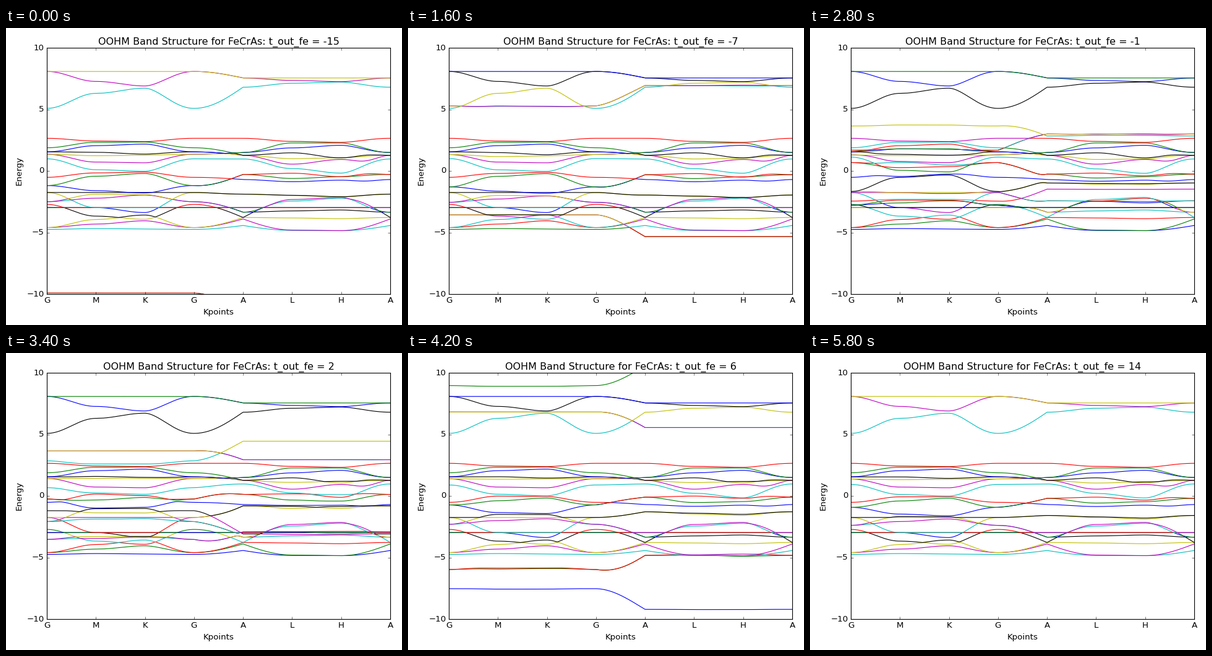
Animation, 640 px wide and 480 px high, one loop 6000 ms. Source, as a matplotlib script:

```python
import numpy as np
import matplotlib.pyplot as plt
from matplotlib.animation import FuncAnimation

plt.style.use("classic")
plt.rcParams.update({
    "figure.facecolor": "white",
    "savefig.dpi": "figure",
    "font.family": "DejaVu Sans",
})

T_MIN, T_MAX = -15, 14
LABELS = ["G", "M", "K", "G", "A", "L", "H", "A"]
KNOTS = [0, 1, 2, 0, 3, 4, 5, 3]      # path through the values at G M K A L H
N = 80                                # samples per segment
U = np.arange(N) / N
COS, SIN = np.cos(np.pi * U / 2), np.sin(np.pi * U / 2)
EASE = (1 - np.cos(np.pi * U)) / 2
SKEW = (1 - np.cos(np.pi * U ** 0.87)) / 2

SMOOTH = [EASE, EASE, SKEW, 1 - COS, EASE, EASE, SKEW]
KINKED = [EASE, EASE, SKEW, 1 - COS, SIN, EASE, 1 - COS]


def path(vals, weights=SMOOTH, bump=0):
    """Band energy along the whole k path; bump bends the last segment."""
    parts = []
    for w, i, j in zip(weights, KNOTS, KNOTS[1:]):
        parts.append(vals[i] + (vals[j] - vals[i]) * w)
    parts[-1] = parts[-1] + bump * np.sin(np.pi * U) ** 2
    return np.append(np.concatenate(parts), vals[3])


def mixing(vals):
    """Coupling strength along the path, rotating from G to A."""
    out = path(vals)
    out[3 * N:4 * N] = vals[0] * COS + vals[3] * SIN
    return out


def vertical(g, a, rise):
    """Quantity that depends on kz only: value g in the G plane, a in the A plane."""
    return np.concatenate([np.full(3 * N, g), g + (a - g) * rise, np.full(3 * N + 1, a)])


# Bands that do not feel t: energies at G, M, K, A, L, H
FREE = [
    path((8.08, 8.08, 8.08, 7.55, 7.55, 7.55)),
    path((8.08, 7.27, 6.90, 7.55, 7.35, 7.25)),
    path((5.08, 6.30, 6.72, 6.80, 7.12, 7.22)),
    path((2.65, 2.43, 2.38, 2.65, 2.40, 2.32)),
    path((1.88, 2.33, 2.35, 1.26, 0.55, 0.93), bump=-0.3),
    path((1.55, 2.05, 2.18, 1.27, 1.47, 1.06), bump=0.1),
    path((-2.72, -3.67, -3.93, -3.78, -2.45, -2.22), KINKED),
    path((-4.60, -4.32, -4.05, -3.90, -4.80, -4.85), KINKED),
    path((-4.60, -3.95, -3.58, -3.78, -3.82, -3.88)),
    path((-4.75, -4.68, -4.72, -4.43, -4.83, -4.85), KINKED),
] + [path((-2.98,) * 6)] * 3

SHIFT = vertical(-1.35, 0.2, 1 - COS)
SPLIT = vertical(0.4, 1.65, SIN)


def block(*levels):
    """Two orbitals joined by the t hopping, plus levels (energy, c_u, c_v)."""
    n = len(levels) + 2
    h = np.zeros((7 * N + 1, n, n))
    h[:, 0, 0] = 0.68 + SPLIT
    h[:, 1, 1] = 0.68 - SPLIT
    for i, (e, cu, cv) in enumerate(levels, 2):
        h[:, i, i] = e
        h[:, 0, i] = h[:, i, 0] = cu
        h[:, 1, i] = h[:, i, 1] = cv
    return h


def level(energy, coupling, bump=0):
    c = mixing(coupling)
    return path(energy, bump=bump), c, c


SINGLE = block(
    (path((0.96, 0.11, -0.02, 0.97, 0.20, -0.17)),
     mixing((0.53, 0.55, 0.55, 0, 0.3, 0.3)),
     mixing((0.53, -0.2, -0.2, 0, -0.3, -0.3))),
)
PAIR_1 = block(
    level((1.37, 1.28, 1.32, 1.50, 1.87, 2.08), (0.28, 0.5, 0.45, 0, 0, 0)),
    level((-1.07, -0.42, -0.20, -0.25, -0.15, -0.42),
          (0.87, 0.25, 0.25, 0.5, 0.5, 0.6), 0.12),
    level((-1.75, -1.75, -1.75, -1.77, -1.87, -1.98), (0, 0, 0, 0.92, 0.88, 0.92)),
    level((-2.45, -1.80, -1.82, -3.35, -2.32, -2.15), (0.57, 0.8, 0.8, 0, 0, 0)),
)
PAIR_2 = block(
    level((1.37, 0.72, 0.66, 1.50, 2.27, 2.27), (0.28, 0.05, 0.05, 0, 0, 0)),
    level((1.55, 1.53, 1.40, 1.27, 1.02, 1.10), (0, 0.3, 0.42, 0, 0.4, 0.45)),
    level((-0.52, -0.12, -0.08, -0.70, -0.87, -0.75), (0, 0.5, 0.3, 0, 0.2, 0), -0.1),
    level((-1.07, -1.55, -1.73, -0.25, -0.60, -0.47),
          (0.87, 0.6, 0.7, 0.5, 0.3, 0.15)),
    level((-1.75, -2.98, -3.38, -1.77, -1.90, -2.03), (0, 0, 0, 0.92, 0.85, 0.8)),
    level((-2.45, -2.15, -1.90, -3.35, -3.25, -3.17), (0.57, 0.63, 0.5, 0, 0, 0)),
)
HOP = 0.796
BLOCKS = [(SINGLE, 2 * HOP), (PAIR_1, -HOP), (PAIR_2, -HOP)]


def bands(t):
    """All energies at every k, sorted from the lowest band up."""
    rows = [np.array(FREE)]
    for h, slope in BLOCKS:
        m = h.copy()
        m[:, 0, 1] = m[:, 1, 0] = slope * t + SHIFT
        rows.append(np.linalg.eigvalsh(m).T)
    return np.sort(np.vstack(rows), axis=0)


fig = plt.figure(figsize=(8, 6), dpi=80)
ax = fig.add_axes([66 / 640, 50 / 480, 555 / 640, 398 / 480])
ax.set_xlim(0, 7)
ax.set_ylim(-10, 10)
ax.set_xticks(range(8))
ax.set_xticklabels(LABELS)
ax.set_yticks(range(-10, 11, 5))
ax.set_xlabel("Kpoints")
ax.set_ylabel("Energy")
title = ax.set_title("")

k = np.arange(7 * N + 1) / N
lines = [ax.plot(k, e, color="bgrcmyk"[i % 7], lw=1)[0]
         for i, e in enumerate(bands(T_MIN))]


def update(i):
    t = T_MIN + i
    for line, e in zip(lines, bands(t)):
        line.set_ydata(e)
    title.set_text(f"OOHM Band Structure for FeCrAs: t_out_fe = {t}")
    return lines + [title]


anim = FuncAnimation(fig, update, frames=T_MAX - T_MIN + 1, interval=200,
                     repeat=True, repeat_delay=0, blit=False)
plt.show()
```
